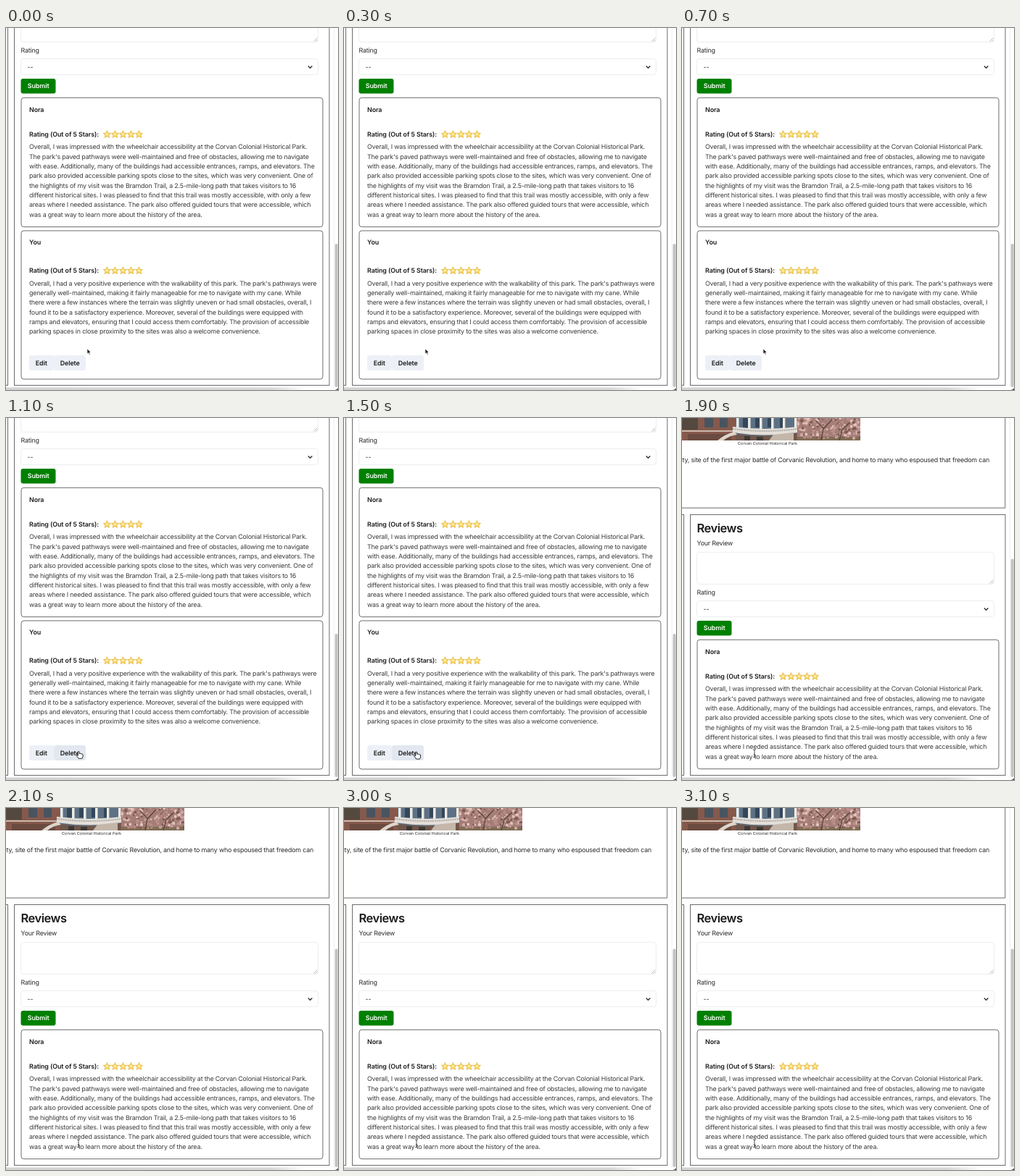
Recreate the animation shown at these times as an HTML page. Size 458x500 px, loop 3.6 s.

```html
<!DOCTYPE html>
<html lang="en">
<head>
<meta charset="utf-8">
<title>Park reviews</title>
<style>
  html, body { margin: 0; width: 100%; height: 100%; overflow: hidden; background: #fff; }
  svg { display: block; width: 458px; height: 500px; }
  text { font-family: Inter, "Open Sans", sans-serif; font-size: 8.89px; letter-spacing: -0.022em;
    fill: #2b2b2b; text-rendering: geometricPrecision; white-space: pre; }
  .bold { font-weight: 600; letter-spacing: -0.008em; fill: #1a1a1a; }
  .body { fill: #3a3a3a; }
  .title { font-size: 16.5px; font-weight: 600; letter-spacing: -0.03em; fill: #1a1a1a; }
  .caption { font-size: 5.6px; letter-spacing: 0; }
  .mid { text-anchor: middle; }
  .box { fill: none; stroke: #6c6c6c; stroke-width: 1; }
  .field { fill: none; stroke: #eceef1; stroke-width: 1; }
</style>
</head>
<body>
<svg id="stage" viewBox="0 0 458 500" xmlns="http://www.w3.org/2000/svg"></svg>
<script>
const NS = 'http://www.w3.org/2000/svg';
const LOOP = 3600, STEP = 100, DELETED = 1900, SCROLL = 210;
const MOVE = { start: 700, end: 1200, from: [112, 443], to: [99.8, 461] };

const stage = document.getElementById('stage');

function add(parent, tag, attrs = {}, content) {
  const el = document.createElementNS(NS, tag);
  for (const key in attrs) el.setAttribute(key, attrs[key]);
  if (content !== undefined) el.textContent = content;
  parent.appendChild(el);
  return el;
}
const group = (parent, attrs) => add(parent, 'g', attrs);
const rect = (parent, x, y, width, height, attrs) =>
  add(parent, 'rect', { x, y, width, height, ...attrs });
const path = (parent, d, attrs) => add(parent, 'path', { d, ...attrs });
const text = (parent, x, y, str, cls = '') => add(parent, 'text', { x, y, class: cls }, str);

function starPoints(cx, cy, r) {
  return Array.from({ length: 10 }, (_, i) => {
    const a = i * Math.PI / 5 - Math.PI / 2, d = i % 2 ? r * 0.47 : r;
    return (cx + d * Math.cos(a)).toFixed(2) + ',' + (cy + d * Math.sin(a)).toFixed(2);
  }).join(' ');
}

function review(parent, top, height, name, lines, gap) {
  rect(parent, 21, top, 416, height, { rx: 3.5, class: 'box' });
  text(parent, 32, top + 19.4, name, 'bold');
  text(parent, 32, top + gap, 'Rating (Out of 5 Stars):', 'bold');
  for (let i = 0; i < 5; i++) {
    const cx = 139.4 + 11 * i, cy = top + gap - 2.9;
    add(parent, 'polygon', { points: starPoints(cx, cy, 5.5), fill: '#f6cf4e',
      stroke: '#dcae3c', 'stroke-width': 0.6, 'stroke-linejoin': 'round' });
    add(parent, 'polygon', { points: starPoints(cx, cy - 0.3, 3.1), fill: '#fdeb9c' });
  }
  lines.forEach((line, i) => text(parent, 32, top + gap + 17.4 + i * 13.33, line, 'body'));
}

function photo(parent) {
  const clip = add(add(stage, 'defs'), 'clipPath', { id: 'photoClip' });
  rect(clip, 0, 0, 246, 31);
  const p = group(parent, { transform: `translate(0 ${-SCROLL})`, 'clip-path': 'url(#photoClip)' });
  rect(p, 0, 0, 246, 31, { fill: '#85594c' });
  rect(p, 0, 0, 22, 16, { fill: '#54493f' });
  rect(p, 31, 0, 12, 13, { fill: '#48545f' });
  rect(p, 52, 0, 11, 13, { fill: '#48545f' });
  rect(p, 0, 17, 74, 2, { fill: '#c9b9ab' });
  rect(p, 8, 22, 60, 9, { fill: '#6b4a40' });
  rect(p, 74, 0, 84, 31, { fill: '#5d7184' });
  for (let x = 84; x < 152; x += 17) rect(p, x, 0, 8, 13, { fill: '#34465a' });
  for (let x = 75; x < 160; x += 16) rect(p, x, 0, 3.5, 18, { fill: '#eeeae4' });
  path(p, 'M70 12Q115 18 160 12V20Q115 27 70 20Z', { fill: '#e4dfd8' });
  path(p, 'M71 15Q115 21 159 15', { fill: 'none', stroke: '#8b8d91', 'stroke-width': 2, 'stroke-dasharray': '1 1.5' });
  path(p, 'M74 22Q115 28 158 21V31H74Z', { fill: '#70574b' });
  path(p, 'M72 19Q60 22 49 31H57Q66 24 76 23Z', { fill: '#ddd5cb' });
  path(p, 'M126 23L154 20V31H120Z', { fill: '#c4b7aa' });
  rect(p, 86, 25, 8, 6, { fill: '#3d3a39' });
  rect(p, 103, 26, 9, 5, { fill: '#3d3a39' });
  rect(p, 159, 0, 87, 31, { fill: '#a57d77' });
  rect(p, 159, 26, 87, 5, { fill: '#806d55' });
  let seed = 17;
  const rnd = () => (seed = seed * 16807 % 2147483647) / 2147483647;
  const tones = ['#d2aba7', '#bd918c', '#e2c5c0', '#7d5b53', '#b78882'];
  for (let i = 0; i < 190; i++) {
    add(p, 'circle', { cx: 160 + rnd() * 86, cy: rnd() * 28, r: 0.8 + rnd() * 1.5, fill: tones[i % 5] });
  }
  path(p, 'M192 31L195 14L184 3M195 15L207 2M217 31L221 16L232 6',
    { fill: 'none', stroke: '#56443b', 'stroke-width': 1.3 });
}

function chevron(parent) {
  path(parent, 'M416.8 52.4l2.8 2.8 2.8-2.8', { fill: 'none', stroke: '#333', 'stroke-width': 1.4 });
}

const neighbour = rect(stage, -20, 0, 22.5, 10, { class: 'box' });
const panel = rect(stage, 11.5, 0, 434.5, 10, { class: 'box' });
const page = group(stage);

// Park description
photo(page);
text(page, 118, -172.7, 'Corvan Colonial Historical Park', 'caption mid');
text(page, 0.5, -149.3, 'ty, site of the first major battle of Corvanic Revolution, and home to many who espoused that freedom can');
path(page, 'M-5 -85.8H445.8V-230', { class: 'box' });

// Review form
text(page, 20.5, -51.8, 'Reviews', 'title');
text(page, 20.5, -33.6, 'Your Review');
rect(page, 20.5, -24.5, 410, 44, { rx: 3.3, class: 'field' });
path(page, 'M424.5 18.5l5-5M427.3 18.5l2.2-2.2', { stroke: '#999', 'stroke-width': 0.7 });
text(page, 20.5, 34.1, 'Rating');
rect(page, 20.5, 42.5, 410, 22, { rx: 3.3, class: 'field' });
text(page, 29.6, 57, '--');
chevron(page);
rect(page, 20.5, 70, 48, 20.5, { rx: 3, fill: '#008000' });
text(page, 44.6, 83.3, 'Submit', 'bold mid').style.fill = '#fff';

// Reviews
review(page, 96.3, 178.4, 'Nora', [
  'Overall, I was impressed with the wheelchair accessibility at the Corvan Colonial Historical Park.',
  "The park's paved pathways were well-maintained and free of obstacles, allowing me to navigate",
  'with ease. Additionally, many of the buildings had accessible entrances, ramps, and elevators. The',
  'park also provided accessible parking spots close to the sites, which was very convenient. One of',
  'the highlights of my visit was the Bramdon Trail, a 2.5-mile-long path that takes visitors to 16',
  'different historical sites. I was pleased to find that this trail was mostly accessible, with only a few',
  'areas where I needed assistance. The park also offered guided tours that were accessible, which',
  'was a great way to learn more about the history of the area.'
], 53.7);

const own = group(page);
review(own, 280, 205, 'You', [
  "Overall, I had a very positive experience with the walkability of this park. The park's pathways were",
  'generally well-maintained, making it fairly manageable for me to navigate with my cane. While',
  'there were a few instances where the terrain was slightly uneven or had small obstacles, overall, I',
  'found it to be a satisfactory experience. Moreover, several of the buildings were equipped with',
  'ramps and elevators, ensuring that I could access them comfortably. The provision of accessible',
  'parking spaces in close proximity to the sites was also a welcome convenience.'
], 58.2);
rect(own, 32, 452, 34, 21, { rx: 3.3, fill: '#edf0f6' });
const del = rect(own, 66, 452, 44, 21, { rx: 3.3 });
text(own, 48.8, 465.5, 'Edit', 'bold mid');
text(own, 88.2, 465.5, 'Delete', 'bold mid');

// Window edges and scrollbar
const fade = add(add(stage, 'defs'), 'linearGradient', { id: 'edge' });
[[0, 1], [0.8, 0.9], [0.9, 0]].forEach(([offset, opacity]) =>
  add(fade, 'stop', { offset, 'stop-color': '#d3d3d3', 'stop-opacity': opacity }));
rect(stage, 0, 496.5, 458, 3.5, { fill: 'url(#edge)' });
rect(stage, 452, 0, 0.8, 497, { fill: '#ececec' });
const thumb = rect(stage, 453.7, 0, 4, 10, { rx: 2, fill: '#c2c2c2' });
path(stage, 'M453 500Q457 499.5 458 497V500Z', { fill: '#444' });

// Pointers, each with its hot spot at 0,0
const outline = { stroke: '#fff', 'stroke-width': 0.7, 'stroke-linejoin': 'round' };
const arrow = path(stage, 'M0 0V7.2L1.7 5.7L2.9 8.4L4.1 7.9L2.9 5.2H5.2Z', { fill: '#111', ...outline });
const hand = path(stage,
  'M-1 .8Q0 -.7 1 .8V3.3Q2 2.6 2.7 3.5Q3.7 2.9 4.3 3.9Q5.6 3.5 5.8 5V7Q5.6 8.4 4.8 10H-.2Q-1.4 7.9 -3 6.3Q-3.1 4.7 -1 5.8Z',
  { fill: '#fff', stroke: '#111', 'stroke-width': 0.9, 'stroke-linejoin': 'round' });
const beam = path(stage, 'M-2 -5.5Q0 -5.5 0 -4.3Q0 -5.5 2 -5.5M0 -4.3V4.3M-2 5.5Q0 5.5 0 4.3Q0 5.5 2 5.5M-1.2 1.6H1.2',
  { fill: 'none', stroke: '#222', 'stroke-width': 0.8, transform: 'translate(100 463.3)' });

const show = (el, on) => el.setAttribute('display', on ? 'inline' : 'none');
function span(el, top, bottom) {
  el.setAttribute('y', top);
  el.setAttribute('height', bottom - top);
}

function draw(time) {
  const t = Math.floor((time % LOOP) / STEP) * STEP;
  const gone = t >= DELETED;
  page.setAttribute('transform', `translate(0 ${gone ? SCROLL : 0})`);
  show(own, !gone);
  const top = gone ? 133.5 : -76.5;
  span(neighbour, top, 493.5);
  span(panel, top, 493.5);
  span(thumb, gone ? 194.5 : 298, 496);

  const p = Math.min(1, Math.max(0, (t - MOVE.start) / (MOVE.end - MOVE.start)));
  const ease = 1 - (1 - p) ** 2;
  const [x, y] = MOVE.from.map((a, i) => a + (MOVE.to[i] - a) * ease);
  const over = x >= 66 && x <= 110 && y >= 452 && y <= 473;
  const place = `translate(${x.toFixed(2)} ${y.toFixed(2)})`;
  arrow.setAttribute('transform', place);
  hand.setAttribute('transform', place);
  show(arrow, !gone && !over);
  show(hand, !gone && over);
  show(beam, gone);
  del.setAttribute('fill', over ? '#e2e7f0' : '#edf0f6');
}

function tick() {
  draw(performance.now());
  requestAnimationFrame(tick);
}
tick();
</script>
</body>
</html>
```
